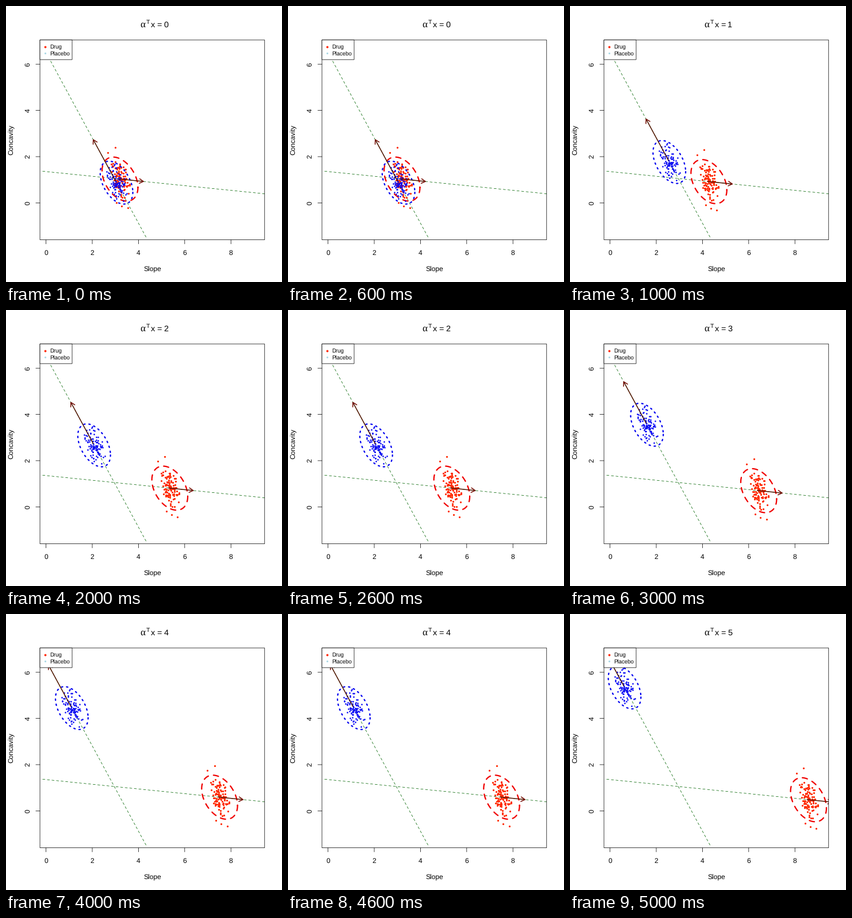
Recreate the animation shown at these times as a matplotlib script. Size 480x480 px, loop 6000 ms.

```python
import numpy as np
import matplotlib.pyplot as plt
from matplotlib.animation import FuncAnimation
from matplotlib.patches import Rectangle

plt.rcParams["text.hinting"] = "none"

PT = 0.9  # points per pixel at 80 dpi
SANS = "Liberation Sans"
LEFT, TOP, RIGHT, BOTTOM = 59.04, 59.04, 449.76, 406.56
UNIT, X0, Y0 = 40.2, 69.6, 342.4
CROSS = np.array([188.3, 300.0])  # where the two directions meet

fig = plt.figure(figsize=(6, 6), dpi=80, facecolor="white")
ax = fig.add_axes([0, 0, 1, 1])
ax.set_xlim(0, 480)
ax.set_ylim(480, 0)
ax.axis("off")
clip = Rectangle((LEFT, TOP), RIGHT - LEFT, BOTTOM - TOP, transform=ax.transData)


def line(xs, ys, color="black", width=0.75, dash=None, z=1, inside=False):
    art, = ax.plot(xs, ys, color=color, lw=width * PT, zorder=z, snap=False,
                   solid_capstyle="round", solid_joinstyle="round")
    if dash:
        art.set_dashes([d / width for d in dash])
        art.set_dash_capstyle("round")
    if inside:
        art.set_clip_path(clip)
    return art


def dots(xs, ys, color, size, z):
    art, = ax.plot(xs, ys, "o", color=color, ms=size * PT, mew=0, zorder=z, snap=False)
    art.set_clip_path(clip)
    return art


def text(x, y, s, size=12.0, font=SANS, ha="center", turn=0):
    return ax.text(x, y, s, fontsize=size * PT, family=font, ha=ha, va="baseline",
                   rotation=turn, rotation_mode="anchor", zorder=8)


def box(x0, y0, x1, y1, face, z):
    ax.add_patch(Rectangle((x0, y0), x1 - x0, y1 - y0, facecolor=face,
                           edgecolor="black", lw=0.75 * PT, zorder=z, snap=False))


def skew(p, q, rho):
    return rho * p + np.sqrt(1 - rho ** 2) * q


class Group:
    """A scatter, its ellipse and an arrow, all moving along one direction."""

    def __init__(self, step, start, lead, length, z):
        self.step, self.start, self.lead = np.array(step), start, lead
        self.shaft = length * self.step
        back = -self.step / np.hypot(*self.step)
        c, s = np.cos(np.pi / 6), np.sin(np.pi / 6)
        left, right = (8 * np.array([[c, k * s], [-k * s, c]]) @ back for k in (1, -1))
        self.head = np.array([left, 0 * left, right])
        self.bar = line([], [], "#501400", 1.5, z=5, inside=True)
        self.barb = line([], [], "#740a00", 1.5, z=5, inside=True)
        self.z = z

    def guide(self, x0, x1):
        slope = self.step[1] / self.step[0]
        xs = np.array([x0, x1])
        line(xs, CROSS[1] + slope * (xs - CROSS[0]), "#006400", dash=(4, 4), inside=True)

    def add_oval(self, w, h, rho, color, dash):
        t = np.linspace(0, 2 * np.pi, 201)
        self.ring = np.array([w * np.cos(t), h * skew(np.cos(t), np.sin(t), rho)])
        self.oval = line([], [], color, 2.25, dash, self.z + 0.2, True)

    def add_cloud(self, seed, n, sd, rho, reach, color, size, outliers=()):
        rng = np.random.default_rng(seed)
        p, q = rng.normal(size=(2, 3 * n))
        keep = np.hypot(p, q) < reach
        p, q = p[keep][:n], q[keep][:n]
        self.pts = np.array([sd[0] * p, sd[1] * skew(p, q, rho) - 1])
        if outliers:
            self.pts = np.hstack([self.pts, np.array(outliers).T])
        self.dots = dots([], [], color, size, self.z)

    def place(self, k):
        mid = (CROSS + (self.start + k) * self.step)[:, None]
        tip = CROSS + (self.lead + k) * self.step
        self.dots.set_data(*(self.pts + mid))
        self.oval.set_data(*(self.ring + mid))
        self.bar.set_data(*np.array([tip - self.shaft, tip]).T)
        self.barb.set_data(*(self.head + tip).T)


# axes
box(LEFT, TOP, RIGHT, BOTTOM, "none", 6)
for v in range(0, 9, 2):
    x = X0 + v * UNIT
    line([x, x], [BOTTOM, BOTTOM + 7.2], z=6)
    text(x, 433, str(v))
for v in range(0, 7, 2):
    y = Y0 - v * UNIT
    line([LEFT - 7.2, LEFT], [y, y], z=6)
    text(41.5, y, str(v), turn=90)
text(254.4, 462, "Slope")
text(12.7, 233, "Concavity", turn=90)

# legend
box(LEFT, TOP, 115, 93.2, "white", 7)
for y, name, color, size in ((70.5, "Drug", "#ff2a00", 3.8), (82.1, "Placebo", "#add8e6", 3.2)):
    dots([67.7], [y], color, size, 8)
    text(76, y + 3.5, name, 9.6, ha="left")

# title
text(233.3, 37, "α", 17, "Liberation Serif", "left")
text(243.3, 30.6, "T", 10.5, ha="left")
text(252.2, 37, "x", 14.4, ha="left")
text(262, 37, "=", 14.4, ha="left")
value = text(274.2, 37, "0", 14.4, ha="left")

drug = Group((43.3, 4.4), 0.23, 1.17, 1, 2)
drug.guide(63.8, 450)
drug.add_oval(31.2, 38.3, 0.38, "#f00000", (9, 9))
drug.add_cloud(4, 95, (8, 18), 0.38, 2.1, "#ff2a00", 3.2,
               [(-8.5, -55), (-21, -46.5), (13.5, 50), (3, 46.5), (-6, 40.5)])

placebo = Group((-19.45, -35.9), -0.2, 1.88, 2, 3)
placebo.guide(77.7, 244.2)
placebo.add_oval(28.4, 37.3, 0.45, "#0000f0", (2.25, 6.75))
placebo.add_cloud(11, 98, (9, 18), 0.5, 2.05, "#0000f5", 2.6)


def draw(k):
    drug.place(k)
    placebo.place(k)
    value.set_text(str(k))
    return []


anim = FuncAnimation(fig, draw, frames=6, interval=1000, repeat=True,
                     repeat_delay=0, init_func=lambda: draw(0), blit=False)
plt.show()
```
